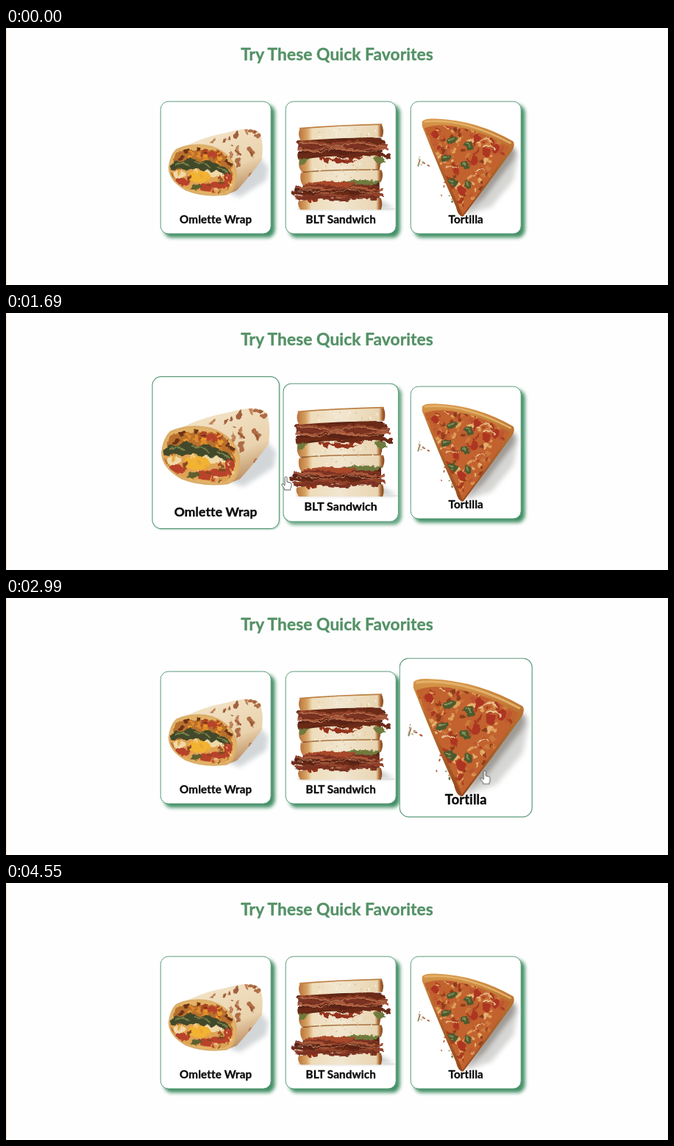
An HTML page that plays this animation: 900 px wide and 350 px high, repeating every 4680 ms.

```html
<!DOCTYPE html>
<html lang="en">
<head>
<meta charset="utf-8">
<title>Quick Favorites</title>
<style>
html, body { margin: 0; width: 100%; height: 100%; overflow: hidden; background: #fefefe; }
body { position: relative; font-family: Lato, "Open Sans", sans-serif; }
.page { position: absolute; left: 0; top: 0; box-sizing: border-box; width: 900px; height: 350px; border: solid #fde0c6; border-width: 0 0 0 1px; box-shadow: inset -1px 0 #f8f3ee; }
h1 { position: absolute; left: 0; top: 24px; width: 900px; margin: 0; text-align: center; font-size: 22.7px; line-height: 24px; font-weight: 700; letter-spacing: .1px; color: #549166; -webkit-text-stroke: .4px; }

.card {
  --rest: 5px 5px 5px #439066;
  --lift: 0 0 0 rgba(67, 144, 102, 0);
  position: absolute; top: 100px; box-sizing: border-box; width: 151px; height: 181px;
  border: 1px solid #5c9c7c; border-radius: 11px; background: #fff;
  box-shadow: var(--rest); translate: -.3px -.4px;
}
.card svg { position: absolute; left: -1px; top: -1px; width: 151px; height: 181px; overflow: visible; }
.card text { font-size: 15.2px; font-weight: 700; letter-spacing: .12px; text-anchor: middle; fill: #0c0c0c; stroke: #0c0c0c; stroke-width: .35px; }
#wrap { left: 210px; animation-name: wrap; }
#blt { left: 380px; animation-name: blt; }
#slice { left: 550px; animation-name: slice; }
#cursor { position: absolute; left: 0; top: 0; width: 1px; height: 1px; overflow: visible; fill: #fff; stroke: #333; stroke-width: .8; stroke-linejoin: round; }

.card, #cursor, #show, #arrow, #hand { animation-duration: 4680ms; animation-iteration-count: infinite; animation-play-state: paused; }
.card { animation-timing-function: ease; }
#cursor { animation-name: move; animation-timing-function: linear; }
#show { animation-name: show; animation-timing-function: step-end; }
#arrow { animation-name: arrow; animation-timing-function: step-end; }
#hand { animation-name: hand; animation-timing-function: step-end; }

@keyframes wrap {
  0%, 13.57%, 44.87%, 100% { transform: none; box-shadow: var(--rest); }
  24.25%, 34.19% { transform: scale(1.2); box-shadow: var(--lift); }
}
@keyframes blt {
  0%, 34.4%, 63.35%, 100% { transform: none; box-shadow: var(--rest); }
  44.87%, 52.67% { transform: scale(1.2); box-shadow: var(--lift); }
}
@keyframes slice {
  0%, 52.67%, 83.5%, 100% { transform: none; box-shadow: var(--rest); }
  63.35%, 72.82% { transform: scale(1.2); box-shadow: var(--lift); }
}
@keyframes move {
  0%, 8.33% { transform: translate(137px, 303px); }
  13.89% { transform: translate(212px, 258px); }
  19.44% { transform: translate(275px, 230px); }
  30.56% { transform: translate(328px, 224px); }
  36.11% { transform: translate(381px, 223px); }
  44.44%, 47.22% { transform: translate(447px, 223px); }
  55.56% { transform: translate(646px, 216px); }
  58.33%, 61.11% { transform: translate(650px, 216px); }
  72.22%, 100% { transform: translate(655px, 293px); }
}
@keyframes show { 0%, 72.7%, 100% { opacity: 0; } 8.33% { opacity: 1; } }
@keyframes arrow { 0% { opacity: 1; } 13.5%, 100% { opacity: 0; } }
@keyframes hand { 0% { opacity: 0; } 13.5%, 100% { opacity: 1; } }
</style>
</head>
<body>
<div class="page"></div>
<h1>Try These Quick Favorites</h1>

<div class="card" id="wrap">
  <svg viewBox="210 100 151 181">
    <defs>
      <linearGradient id="dough" x1="0.3" y1="0" x2="0.75" y2="1">
        <stop offset="0" stop-color="#f3e4c8"/><stop offset=".6" stop-color="#ead3ae"/><stop offset="1" stop-color="#b58355"/>
      </linearGradient>
      <filter id="soft" x="-30%" y="-30%" width="160%" height="160%"><feGaussianBlur stdDeviation="3"/></filter>
      <filter id="rough" x="-10%" y="-10%" width="120%" height="120%">
        <feTurbulence type="fractalNoise" baseFrequency=".13" numOctaves="2" seed="4"/>
        <feDisplacementMap in="SourceGraphic" scale="7" xChannelSelector="R" yChannelSelector="G"/>
      </filter>
      <clipPath id="rollClip"><path id="roll" d="M232 168Q262 150 300 143Q335 133 346 144Q351 160 348 180Q334 200 314 222L298 228Z"/></clipPath>
      <clipPath id="faceClip"><path id="face" d="M232 166Q255 156 280 162Q308 172 313 195Q315 220 300 227Q270 231 245 221Q222 208 222 190Q224 174 232 166Z"/></clipPath>
    </defs>
    <path d="M300 224L345 176L357 190L354 208L318 231Z" fill="#c4c9cc" opacity=".75" filter="url(#soft)"/>
    <use href="#roll" fill="url(#dough)"/>
    <g clip-path="url(#rollClip)"><g id="char" filter="url(#rough)"></g></g>
    <use href="#face" fill="#e3b266"/>
    <g clip-path="url(#faceClip)"><g filter="url(#rough)">
      <path d="M232 170Q260 162 286 168Q306 180 309 200L300 222Q262 226 238 214L222 200Z" fill="#b8702e"/>
      <g id="cheese"></g>
      <path d="M222 194Q258 186 306 200L298 224Q262 226 236 216Z" fill="#dfa354"/>
      <ellipse cx="284" cy="198" rx="13" ry="6" fill="#f0d9a8"/>
      <ellipse cx="236" cy="200" rx="9" ry="5" fill="#f0d9a8"/>
      <ellipse cx="263" cy="203" rx="16" ry="8" fill="#f2b233"/>
      <g fill="#b8432a">
        <ellipse cx="240" cy="210" rx="9" ry="5" transform="rotate(20 240 210)"/>
        <ellipse cx="281" cy="216" rx="18" ry="7" transform="rotate(-6 281 216)"/>
        <ellipse cx="302" cy="206" rx="6" ry="11"/>
        <ellipse cx="281" cy="173" rx="9" ry="4"/>
      </g>
      <g id="bits"></g>
      <path d="M223 188Q230 179 242 183Q250 174 262 182Q278 177 288 187Q302 187 306 201Q294 197 284 195Q268 196 260 191Q246 197 236 191Q228 198 223 188Z" fill="#434a2a"/>
      <path d="M230 187Q240 181 248 188M258 184Q270 182 278 190M286 189Q296 192 302 199" fill="none" stroke="#78814a" stroke-width="2"/>
      <ellipse cx="259" cy="217" rx="7" ry="4" fill="#5f602f"/>
    </g></g>
    <use href="#face" fill="none" stroke="#d9ae6c" stroke-width="2"/>
    <text x="285.5" y="266">Omlette Wrap</text>
  </svg>
</div>

<div class="card" id="blt">
  <svg viewBox="380 100 151 181">
    <defs>
      <linearGradient id="bread">
        <stop offset="0" stop-color="#b9733a"/><stop offset=".1" stop-color="#d8a364"/><stop offset=".16" stop-color="#eedcba"/>
        <stop offset=".5" stop-color="#f1e6d0"/><stop offset=".93" stop-color="#e9d5b2"/><stop offset=".97" stop-color="#a9622f"/><stop offset="1" stop-color="#84481f"/>
      </linearGradient>
    </defs>
    <path d="M397 247L408 238L512 236L529 247Z" fill="#b9bbbd" opacity=".7" filter="url(#soft)"/>
    <path d="M397 247H529" stroke="#d3d5d6" stroke-width="1"/>
    <path d="M402 150H510V182H402ZM404 192H508V240H404Z" fill="#5b2414"/>
    <g fill="url(#bread)">
      <path d="M399 180Q450 172 508 174Q511 184 508 193L402 196Q397 190 399 180Z"/>
      <path d="M401 198Q450 191 511 194Q514 202 510 210L404 215Q399 208 401 198Z"/>
      <path d="M398 236Q450 228 510 232Q513 240 510 248H401Q396 242 398 236Z"/>
    </g>
    <path d="M402 196.500Q450 193 508 193.500" stroke="#a8733f" stroke-width="1.4" fill="none"/>
    <g filter="url(#rough)">
      <path d="M396 178Q404 172 412 178Q408 187 400 186ZM500 176Q510 174 516 182Q508 188 502 183ZM455 211Q480 205 512 209Q500 217 470 216Z" fill="#6f7a3c"/>
      <path d="M405 213Q440 206 478 212Q470 219 410 219Z" fill="#a9482b"/>
      <path d="M425 176q4 9 7 2q5 14 9 1q9 8 15-1zM440 178q12 12 38 3zM466 176q4 12 8 1q7 6 11-1zM410 230q3 18 7 3q6 8 10-3zM458 232q5 7 9 0z" fill="#93301a"/>
      <g id="bacon" fill="none" stroke-linecap="round" stroke-linejoin="round"></g>
    </g>
    <path d="M400 137Q450 133 511 131.500Q515 140 512 149Q450 150 401 154Q396 146 400 137Z" fill="url(#bread)"/>
    <path d="M400 137Q450 133 511 131.500" stroke="#bd8145" stroke-width="1.6" fill="none" stroke-linecap="round"/>
    <g id="crumb"></g>
    <text x="455.5" y="266">BLT Sandwich</text>
  </svg>
</div>

<div class="card" id="slice">
  <svg viewBox="550 100 151 181">
    <defs>
      <linearGradient id="crust" x1="0" y1="0" x2="0" y2="1">
        <stop offset="0" stop-color="#d99a4c"/><stop offset=".3" stop-color="#b96f2f"/><stop offset="1" stop-color="#96481d"/>
      </linearGradient>
      <clipPath id="topClip"><path id="top" d="M569 137Q582 132 596 133Q640 136 685 163Q654 212 621 255Q604 215 569 137Z"/></clipPath>
    </defs>
    <path d="M686 164L697 172L690 208L660 244L624 256Z" fill="#cfcfcd" opacity=".85" filter="url(#soft)"/>
    <path d="M682 160L694 166L690 180L650 232L622 256Z" fill="#77716b" opacity=".6" filter="url(#soft)"/>
    <path d="M566 128Q569 123 585 124Q640 126 690 155Q693 160 688 168Q655 214 622 257Q615 258 612 244Q590 195 566 134Z" fill="url(#crust)"/>
    <path d="M570 128Q620 122 686 157" fill="none" stroke="#e3b069" stroke-width="2.500" stroke-linecap="round"/>
    <use href="#top" fill="#c2622f"/>
    <g clip-path="url(#topClip)"><g id="melt" filter="url(#rough)"></g></g>
    <g filter="url(#rough)">
      <g id="tomato" fill="#ad3520"></g>
      <path d="M643 156q10-9 18 0M648 163q10-7 16 3M598 191q8-5 15 0M638 196q7-6 12-1" fill="none" stroke="#ecc999" stroke-width="1.4"/>
      <g id="basil" fill="#4d5a2e"></g>
    </g>
    <g id="flakes"></g>
    <text x="625.5" y="266">Tortilla</text>
  </svg>
</div>

<svg id="cursor">
  <g id="show">
    <path id="arrow" d="M0 0V16l3.8-3.6 2.5 5.8 2.3-1-2.4-5.6h5.2z"/>
    <path id="hand" d="M-2 11V1.5a1.5 1.5 0 0 1 3 0V7l4 .8q2.2.5 2.1 2.7l-.4 3.5q-.2 1.5-1 2.5V18H-2.5v-1.5L-6 11.5q-.7-1.6.8-1.8 1.2 0 3.2 2.3z"/>
  </g>
</svg>

<script>
const $ = id => document.getElementById(id);
const NS = 'http://www.w3.org/2000/svg';
let seed = 11;
const rnd = () => (seed = seed * 16807 % 2147483647) / 2147483647;

function add(id, tag, attrs) {
  const el = document.createElementNS(NS, tag);
  for (const k in attrs) el.setAttribute(k, attrs[k]);
  $(id).append(el);
}

function blob(id, x, y, rx, ry, turn, extra) {
  add(id, 'ellipse', { rx, ry, transform: `translate(${x} ${y}) rotate(${turn})`, ...extra });
}

// Random flecks inside a box
function scatter(id, n, [x, y, w, h], size, colors, opacity = 1) {
  for (let i = 0; i < n; i++) {
    const r = size * (0.4 + 0.6 * rnd());
    blob(id, x + w * rnd(), y + h * rnd(), r, r * 0.5, 180 * rnd(),
      { fill: colors[i % colors.length], opacity });
  }
}

function strip(x0, x1, y, amp, phase, color, width) {
  let d = '';
  for (let x = x0; x <= x1; x += 3)
    d += `${d ? 'L' : 'M'}${x} ${(y + amp * Math.sin(x / 10 + phase)).toFixed(1)}`;
  add('bacon', 'path', { d, stroke: color, 'stroke-width': width });
}

scatter('char', 22, [276, 140, 72, 64], 6.5, ['#a55a32', '#b97448', '#944a24'], 0.85);
scatter('cheese', 40, [236, 164, 70, 24], 5, ['#e89a2c', '#ad4322', '#dd8a2a', '#6c3318']);
scatter('bits', 30, [226, 192, 82, 34], 4, ['#f0d29a', '#a23c20', '#e8a23a', '#7b4a22'], 0.85);

const meat = ['#6b2a19', '#93432a', '#7b3320', '#a9583a', '#5a2114'];
for (let i = 0; i < 6; i++) {
  strip(390 + 10 * rnd(), 512 + 11 * rnd(), 154 + i * 3.9, 2, i * 1.1, meat[i % 5], 4.8);
  strip(391 + 8 * rnd(), 504 + 11 * rnd(), 217 + i * 3, 1.8, i * 1.3, meat[(i + 2) % 5], 4);
}
strip(398, 520, 159, 2, 1, '#c98f68', 0.9);
strip(396, 514, 167, 2, 3, '#bf7f58', 0.9);
strip(400, 508, 223, 2, 2, '#c08560', 0.9);
scatter('crumb', 22, [420, 137, 84, 12], 2, ['#dfcba6', '#f8f0df']);
scatter('crumb', 24, [420, 182, 82, 26], 2, ['#dcc59c', '#f7ecd8']);

scatter('melt', 240, [568, 132, 118, 124], 5, ['#dfa05a', '#a83a20', '#cc7a3c', '#8c3c1c', '#e6b170', '#bc5430']);
for (const [x, y] of [[653, 170], [637, 182], [583, 146], [667, 164], [612, 195], [640, 151], [620, 222]])
  blob('tomato', x, y, 6, 5, x);
for (const [x, y] of [[606, 153], [629, 160], [599, 177], [625, 187], [607, 210], [628, 213]]) {
  blob('basil', x, y, 7, 4.5, y * 7);
  blob('basil', x - 1, y - 1, 4, 1.2, y * 7, { fill: '#84905a' });
}
scatter('flakes', 12, [560, 176, 20, 12], 2.2, ['#b5b08a', '#b65c35', '#8a8a60']);
scatter('flakes', 10, [592, 202, 16, 36], 2.4, ['#b4512b', '#6f7c48']);

// The motion advances in ticks of 130 ms
const TICK = 130, LOOP = 4680;
const anims = document.getAnimations();
function draw() {
  const t = Math.floor(performance.now() % LOOP / TICK) * TICK;
  for (const a of anims) a.currentTime = t;
  requestAnimationFrame(draw);
}
draw();
</script>
</body>
</html>
```
